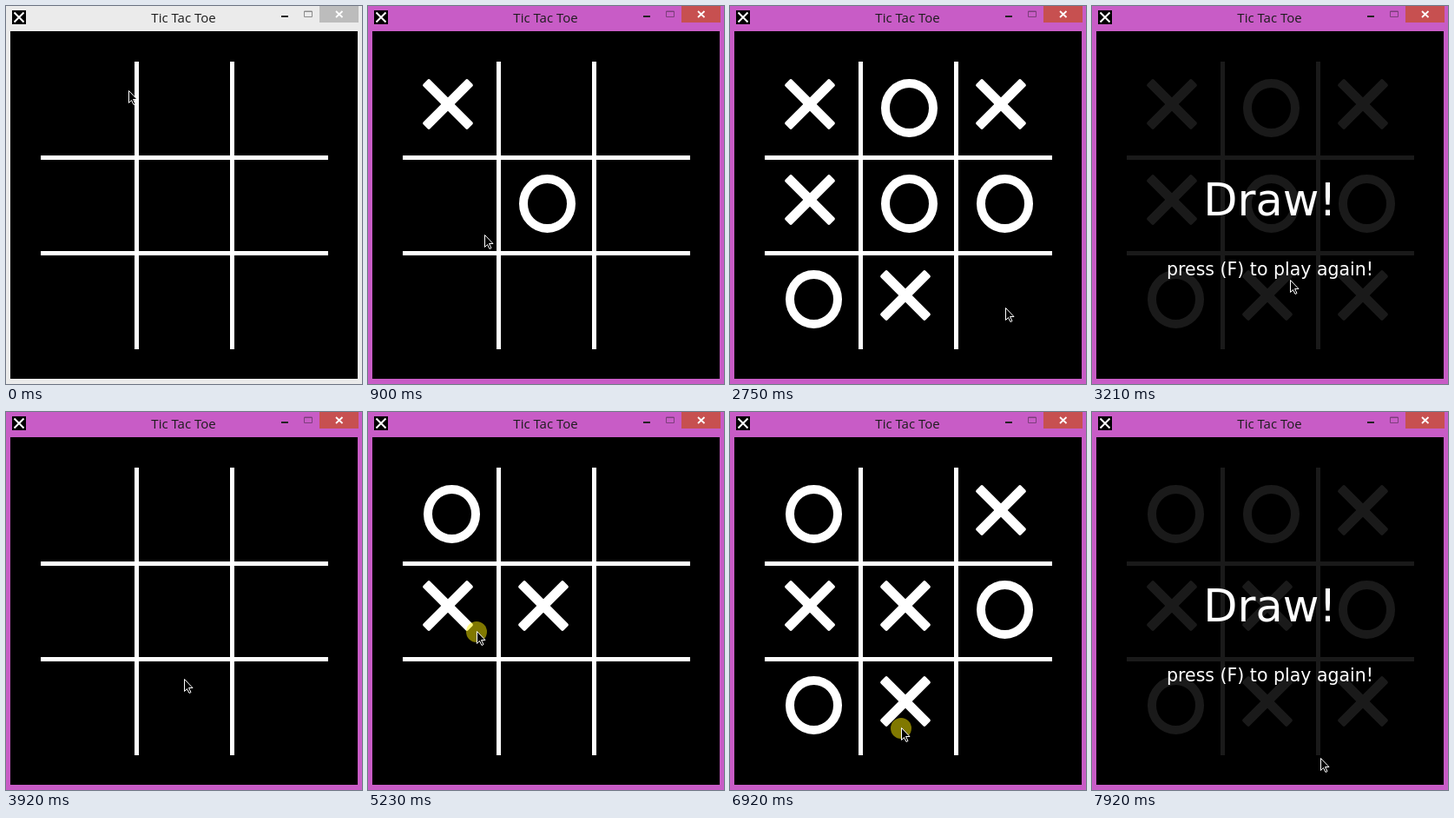
Write an HTML page that moves like this. It is 410 px wide and 435 px high and loops after 7.99 s.

```html
<!DOCTYPE html>
<html lang="en">
<head>
<meta charset="utf-8">
<title>Tic Tac Toe</title>
<style>
  html, body { margin: 0; width: 100%; height: 100%; overflow: hidden; }
  svg { display: block; width: 410px; height: 435px; }
  #window { --frame: #c85cc6; --close: #c75050; --max: #7d3f7c; }
  #window.inactive { --frame: #ebebeb; --close: #bcbcbc; --max: #8c8c8c; }
  .frame { fill: var(--frame); }
  .close { fill: var(--close); }
  .max { fill: none; stroke: var(--max); }
  .title { font: 15px "Open Sans", sans-serif; fill: #1c1c1c; }
  .message { font-family: "DejaVu Sans", Verdana, sans-serif; fill: #fff; }
  text { text-anchor: middle; }
</style>
</head>
<body>
<svg id="window" viewBox="0 0 410 435">
  <defs>
    <g id="x" fill="#fff">
      <rect x="-36.5" y="-5.5" width="73" height="11" rx="2" transform="translate(92 113) rotate(45)"/>
      <rect x="-36.5" y="-5.5" width="73" height="11" rx="2" transform="translate(92 113) rotate(-45)"/>
    </g>
    <ellipse id="o" cx="96.5" cy="117.5" rx="27.5" ry="28.5" fill="none" stroke="#fff" stroke-width="10"/>
  </defs>

  <rect class="frame" width="410" height="435"/>
  <rect x="7" y="5" width="16" height="16"/>
  <path d="M9.5 7.5l11 11m0-11l-11 11" stroke="#fff" stroke-width="2"/>
  <text class="title" x="204.5" y="19">Tic Tac Toe</text>
  <path d="M317 12h8" stroke="#222" stroke-width="2"/>
  <path class="max" d="M343.5 6v6.500h9v-6.500zM343 6.500h10"/>
  <rect class="close" x="361" width="45" height="19"/>
  <path d="M380 6l7.500 7m0-7l-7.500 7" stroke="#fff" stroke-width="1.800"/>
  <rect x="5" y="29" width="400" height="400"/>

  <g id="board">
    <path d="M150.500 64v331M260.500 64v331M40 174.500h331M40 284.500h331" stroke="#fff" stroke-width="5"/>
    <g id="marks"></g>
  </g>
  <g id="result" class="message">
    <text x="205" y="240.500" font-size="51">Draw!</text>
    <text x="205" y="309.500" font-size="20.500">press (F) to play again!</text>
  </g>

  <circle id="press" r="12" fill="#fff000" fill-opacity=".5"/>
  <path id="cursor" d="M.5 .5V14.500l3-3 2.500 5 2-1-2.500-5h4.500z" fill="#000" stroke="#fff"/>
</svg>
<script>
const LOOP = 7990, PRESS_TIME = 150, ACTIVATED = 230;

// Screen refreshes: [first, last, count], evenly spaced.
const refreshes = [
  [0, 0, 1], [70, 820, 11], [900, 1680, 11], [1750, 2520, 11], [2600, 3290, 10],
  [3520, 3520, 1], [3920, 3920, 1], [4140, 4680, 8], [4850, 5610, 11],
  [5690, 6460, 11], [6530, 7300, 11], [7380, 7920, 8]
].flatMap(([first, last, count]) => Array.from({ length: count }, (_, i) =>
  Math.round((first + (last - first) * i / Math.max(1, count - 1)) / 10) * 10));

// Moves are [time, cell], cells counted row by row; X always starts.
const games = [
  { start: 0, end: 3920, draw: 3060, moves: [[230, 0], [450, 4], [1050, 3], [1280, 6],
    [1830, 2], [2060, 1], [2290, 7], [2520, 5], [2900, 8]] },
  { start: 3920, end: LOOP, draw: 7690, moves: [[4290, 4], [4510, 0], [5160, 3], [5390, 5],
    [5850, 2], [6080, 6], [6850, 7], [7080, 1], [7460, 8]] }
];

// Pointer stops: [time, x, y]
const stops = [
  [0, 141, 97], [230, 108, 118], [400, 108, 120], [900, 134, 263], [1050, 110, 240],
  [1150, 110, 240], [1400, 165, 381], [1680, 272, 178], [1830, 312, 122], [1950, 312, 122],
  [2290, 205, 364], [2400, 205, 364], [2750, 317, 347], [2900, 318, 345], [3020, 318, 345],
  [3290, 204, 307], [3450, 204, 307], [3520, 205, 307], [4070, 205, 307], [4290, 226, 240],
  [4400, 226, 240], [4680, 150, 334], [4850, 115, 343], [5160, 125, 252], [5300, 125, 252],
  [5610, 240, 212], [5850, 310, 125], [5970, 310, 125], [6460, 150, 345], [6530, 122, 352],
  [6850, 197, 363], [6980, 197, 363], [7300, 258, 345], [7460, 305, 340], [7560, 305, 340],
  [7750, 290, 420], [7920, 263, 398]
];

const el = id => document.getElementById(id);
const show = (node, on) => node.setAttribute("visibility", on ? "visible" : "hidden");

for (const game of games) {
  game.marks = game.moves.map(([, cell], i) => {
    const mark = document.createElementNS("http://www.w3.org/2000/svg", "use");
    mark.setAttribute("href", i % 2 ? "#o" : "#x");
    mark.setAttribute("x", cell % 3 * 110);
    mark.setAttribute("y", Math.floor(cell / 3) * 110);
    return el("marks").appendChild(mark);
  });
}

function pointerAt(t) {
  const next = stops.findIndex(stop => stop[0] > t);
  if (next < 0) return stops[stops.length - 1].slice(1);
  const [t0, x0, y0] = stops[next - 1], [t1, x1, y1] = stops[next];
  const u = (t - t0) / (t1 - t0), ease = u * u * (3 - 2 * u);
  return [x0 + (x1 - x0) * ease, y0 + (y1 - y0) * ease].map(Math.round);
}

function render(t) {
  let pressed = false, drawn = false;
  for (const { start, end, draw, moves, marks } of games) {
    const playing = t >= start && t < end;
    drawn ||= playing && t >= draw;
    moves.forEach(([time], i) => {
      show(marks[i], playing && t >= time);
      pressed ||= i % 2 === 0 && t >= time && t < time + PRESS_TIME;
    });
  }
  el("window").classList.toggle("inactive", t < ACTIVATED);
  el("board").setAttribute("opacity", drawn ? 0.1 : 1);
  show(el("result"), drawn);
  show(el("press"), pressed);
  const [x, y] = pointerAt(t);
  el("cursor").setAttribute("transform", `translate(${x} ${y})`);
  el("press").setAttribute("transform", `translate(${x} ${y + 1})`);
}

const began = performance.now();
function tick() {
  const t = (performance.now() - began) % LOOP;
  render(refreshes.filter(time => time <= t).pop());
  requestAnimationFrame(tick);
}
tick();
</script>
</body>
</html>
```
